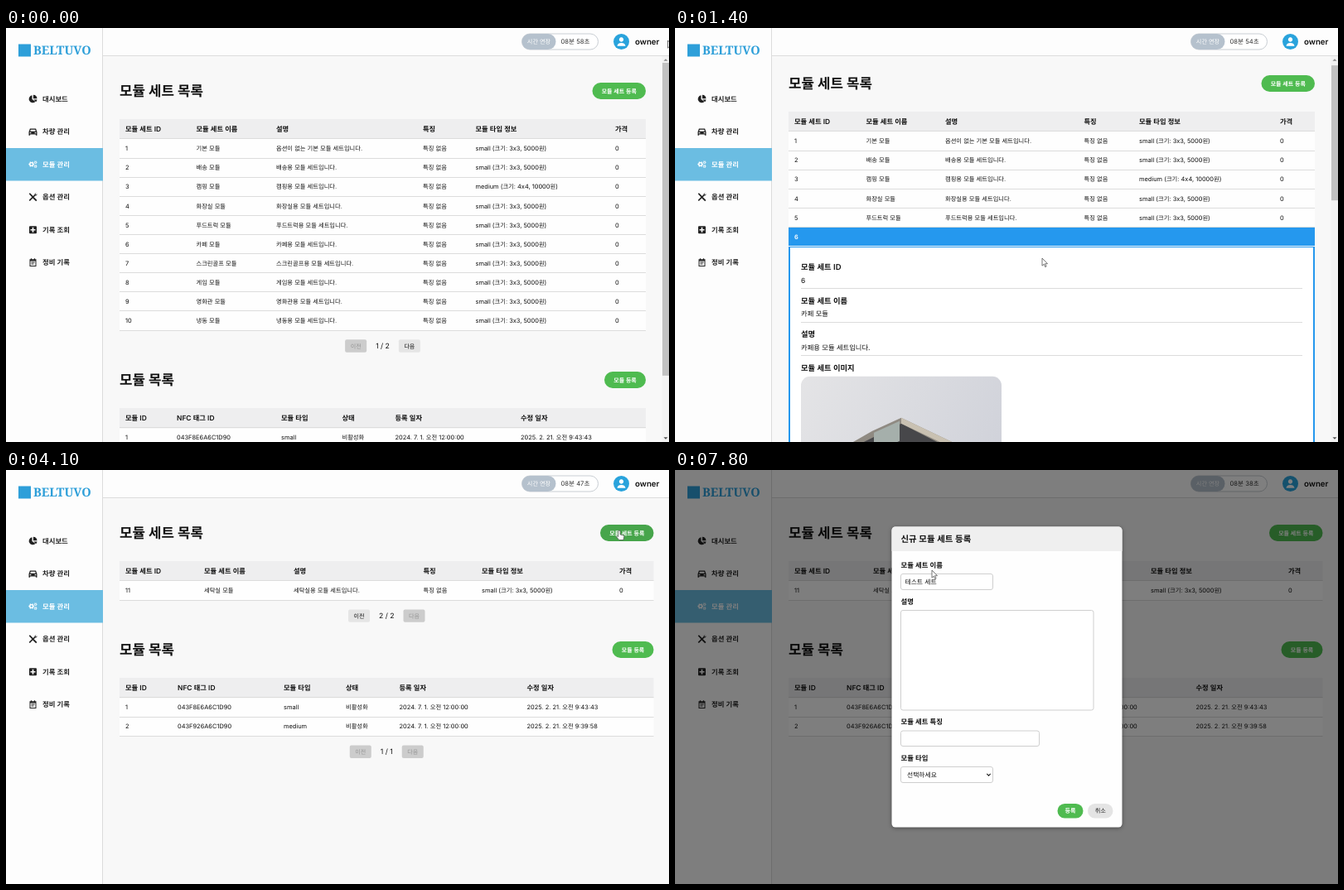
An HTML page with a canvas that plays this animation: 800 px wide and 500 px high, repeating every 8000 ms.

```html
<!DOCTYPE html>
<html lang="ko">
<head>
<meta charset="utf-8">
<title>모듈 관리</title>
<style>
  html, body { margin: 0; width: 100%; height: 100%; overflow: hidden; background: #f8f8f8; }
  canvas { display: block; width: 800px; height: 500px; }
</style>
</head>
<body>
<canvas id="stage" width="800" height="500"></canvas>
<script>
const ctx = document.getElementById('stage').getContext('2d');
ctx.textRendering = 'geometricPrecision';

const LOOP = 8000, STEP = 100;
const BLUE = '#2e9fd9', OPEN_BLUE = '#2598ee', GREEN = '#4fbb50', INK = '#111', LINE = '#dcdcdc';
const ROW = 23.1, LEFT = 137;
const HANGUL = /[가-힣ㄱ-ㅎ]+|[^가-힣ㄱ-ㅎ]+/g;

// ---- timing tables: [ms, value...] ----
const SCROLL = [[0, 0], [600, 0], [1000, 449], [1300, 9], [1700, 9], [2400, 770]];
const POINTER = [
  [0, 798.5, 15], [400, 430, 146], [600, 430, 146], [1000, 409, 172], [1300, 440, 250],
  [1400, 443, 278], [1800, 443, 278], [2500, 484.5, 349], [3000, 484.5, 349], [4000, 740, 73],
  [5200, 740, 73], [5400, 600, 95], [6000, 310, 132], [6200, 310, 121]
];
const OPEN_FIRST = 500, OPEN_CAFE = 1300, NEXT_PAGE = 2700, OPEN_MODAL = 4800, TYPE_START = 6500;
const TYPED = ['ㅌ', '테', '텟', '테스', '테슽', '테스트', '테스트 ', '테스트 ㅅ',
  '테스트 세', '테스트 셑', '테스트 세트'];

// ---- data ----
const SMALL = 'small (크기: 3x3, 5000원)', MEDIUM = 'medium (크기: 4x4, 10000원)';
const KINDS = ['기본', '배송', '캠핑', '화장실', '푸드트럭', '카페', '스크린골프', '게임', '영화관', '냉동', '세탁실'];
const SETS = KINDS.map((kind, i) => [
  String(i + 1), kind + ' 모듈',
  i ? kind + '용 모듈 세트입니다.' : '옵션이 없는 기본 모듈 세트입니다.',
  '특징 없음', i === 2 ? MEDIUM : SMALL, '0'
]);
const SET_HEADS = ['모듈 세트 ID', '모듈 세트 이름', '설명', '특징', '모듈 타입 정보', '가격'];
const MODULES = [
  ['1', '043F8E6A6C1D90', 'small', '비활성화', '2024. 7. 1. 오전 12:00:00', '2025. 2. 21. 오전 9:43:43'],
  ['2', '043F926A6C1D90', 'medium', '비활성화', '2024. 7. 1. 오전 12:00:00', '2025. 2. 21. 오전 9:39:58']
];
const MODULE_HEADS = ['모듈 ID', 'NFC 태그 ID', '모듈 타입', '상태', '등록 일자', '수정 일자'];
const OPTIONS = [['테이블', 'x2'], ['의자', 'x4'], ['냉장고', 'x1'], ['커피머신', 'x1'], ['조명', 'x2'], ['소파', 'x1']];
const COLS = {
  closed: [144, 229.5, 326, 503, 566.5, 735],
  open: [144, 230.5, 326, 493.5, 560, 730],
  last: [144, 239, 347, 503.5, 574, 740],
  modules: [144, 206, 332, 405.5, 469.5, 621],
  modulesWide: [144, 207, 335, 410, 474.5, 628.5]
};

// ---- drawing helpers ----
function setFont(part, size, weight) {
  ctx.font = /[가-힣ㄱ-ㅎ]/.test(part)
    ? `${weight} ${size * 0.94}px "Noto Sans CJK KR", "Noto Sans CJK", sans-serif`
    : `${weight} ${size * 0.96}px Inter, sans-serif`;
}

function textWidth(str, size, weight = 400) {
  return str.match(HANGUL).reduce((sum, part) => {
    setFont(part, size, weight);
    return sum + ctx.measureText(part).width;
  }, 0);
}

// y is the visual middle of the line
function text(str, x, y, size, weight = 400, color = INK, centered = false) {
  if (centered) x -= textWidth(str, size, weight) / 2;
  ctx.fillStyle = color;
  for (const part of str.match(HANGUL)) {
    setFont(part, size, weight);
    ctx.fillText(part, x, y + size * 0.35);
    x += ctx.measureText(part).width;
  }
}

function rect(x, y, w, h, color) {
  ctx.fillStyle = color;
  ctx.fillRect(x, y, w, h);
}

function box(x, y, w, h, r, fill, stroke) {
  ctx.beginPath();
  ctx.roundRect(x, y, w, h, r);
  if (fill) { ctx.fillStyle = fill; ctx.fill(); }
  if (stroke) { ctx.strokeStyle = stroke; ctx.lineWidth = 1; ctx.stroke(); }
}

function hline(x1, x2, y) {
  rect(x1, Math.round(y), x2 - x1, 1, LINE);
}

function shape(d, x, y, fill, stroke, width = 1) {
  const path = new Path2D(d);
  ctx.save();
  ctx.translate(x, y);
  if (fill) { ctx.fillStyle = fill; ctx.fill(path, 'evenodd'); }
  if (stroke) { ctx.strokeStyle = stroke; ctx.lineWidth = width; ctx.stroke(path); }
  ctx.restore();
}

function ease(p) { return p * p * (3 - 2 * p); }

function at(keys, t) {
  let i = keys.length - 1;
  while (i > 0 && keys[i][0] > t) i--;
  const a = keys[i], b = keys[i + 1];
  if (!b) return a.slice(1);
  const p = ease((t - a[0]) / (b[0] - a[0]));
  return a.slice(1).map((v, k) => v + (b[k + 1] - v) * p);
}

// ---- page frame ----
const MENU = [
  ['대시보드', 'M-1-4.6A4.6 4.6 0 1 0 3 3.2L-1 .2Z M.4-5A4.8 4.8 0 0 1 5-.6H.4Z M.8.7H5A4.8 4.8 0 0 1 3.7 3.4Z'],
  ['차량 관리', 'M-5 .2L-3.6-3.8H3.6L5 .2V4.5H3.4V3.2H-3.4V4.5H-5Z M-3.4-.5H3.4L2.6-2.6H-2.6Z M-3.8 .8h1.6v1.2h-1.6Z M2.2 .8h1.6v1.2h-1.6Z'],
  ['모듈 관리', null],
  ['옵션 관리', 'M-4.8-4L-3.6-5L.2-1.2L2-3Q1.8-5 4-4.8L2.8-3.4L3.6-2.7L5-4Q5.2-1.6 3-1.8L1.2 0L5 3.6L3.6 5L-.2 1.2L-3.6 4.8L-4.9 3.6L-1.2 0Z'],
  ['기록 조회', 'M-4.5-3.5q0-1 1-1h7q1 0 1 1v7q0 1-1 1h-7q-1 0-1-1Z M-.8-3V-.8H-3V.8H-.8V3H.8V.8H3V-.8H.8V-3Z'],
  ['정비 기록', 'M-4-4H-2.6V-5H-1.4V-4H1.4V-5H2.6V-4H4V4.6H-4Z M-3-1.8V3.6H3V-1.8Z M-2-.8H2V.2H-2Z M-2 1.3H1V2.3H-2Z']
];

function gear(x, y, r) {
  ctx.strokeStyle = '#fff';
  ctx.lineWidth = r * 0.75;
  ctx.beginPath();
  ctx.arc(x, y, r, 0, 7);
  ctx.stroke();
  for (let i = 0; i < 6; i++) {
    const a = i * Math.PI / 3;
    ctx.beginPath();
    ctx.moveTo(x + r * Math.cos(a), y + r * Math.sin(a));
    ctx.lineTo(x + r * 1.75 * Math.cos(a), y + r * 1.75 * Math.sin(a));
    ctx.stroke();
  }
}

function sidebar() {
  rect(0, 0, 116, 500, '#fdfdfd');
  rect(116, 0, 1, 500, LINE);
  rect(15, 19.5, 15, 15, BLUE);
  ctx.font = '700 14.6px "Noto Serif", serif';
  ctx.fillStyle = BLUE;
  ctx.fillText('BELTUVO', 33, 32.3);
  rect(0, 145, 117, 39.5, '#6bbde2');
  MENU.forEach(([label, icon], i) => {
    const y = 85.5 + i * 39.5, color = icon ? '#222' : '#fff';
    if (icon) shape(icon, 32.5, y + 0.3, color);
    else { gear(30.7, y, 1.9); gear(35.6, y - 2.2, 1.1); gear(35.6, y + 2.5, 1.1); }
    text(label, 44, y, 8.9, 600, color);
  });
}

function topbar(t) {
  rect(117, 0, 683, 33, '#fdfdfd');
  rect(117, 33, 683, 1, LINE);
  box(622.5, 7, 92, 19, 9.5, '#fff', '#c9ced3');
  box(622.5, 7, 41, 19, 9.5, '#b5c1cd');
  text('시간 연장', 643, 16.5, 7.6, 400, '#fff', true);
  const sec = Math.floor(58.42 - t * 2.55 / 1000);
  text(`08분 ${sec}초`, 669.5, 16.5, 8, 400, '#333');
  ctx.fillStyle = '#29a3dc';
  ctx.beginPath();
  ctx.arc(742.5, 16.5, 9.5, 0, 7);
  ctx.fill();
  shape('M0-5.2A2.7 2.7 0 1 1 -.01-5.2Z M-5 5.2Q-4.6 1.4 0 1.4Q4.6 1.4 5 5.2Z', 742.5, 16.5, '#fff');
  text('owner', 759, 16.5, 10.1, 600);
}

function scrollbar(scroll, height) {
  rect(791.5, 34, 8.5, 466, '#f3f3f3');
  shape('M-2.5 1.3L0-1.3L2.5 1.3Z', 796, 38.5, '#8a8a8a');
  shape('M-2.5-1.3L0 1.3L2.5-1.3Z', 796, 495.5, '#505050');
  const k = 450 / height;
  rect(792, 42 + scroll * k, 8, 466 * k, '#c1c1c1');
}

// ---- content ----
function poly(points, color) {
  ctx.fillStyle = color;
  ctx.beginPath();
  for (let i = 0; i < points.length; i += 2) ctx.lineTo(points[i], points[i + 1]);
  ctx.fill();
}

function picture(y, isCafe) {
  ctx.save();
  ctx.translate(152, y);
  const tone = ctx.createLinearGradient(0, 0, 242, isCafe ? 120 : 0);
  const tones = isCafe ? ['#e4e4e6', '#dadbe0', '#cfd1d9'] : ['#d3d2d1', '#e4e3e2', '#dad9d7'];
  tones.forEach((color, i) => tone.addColorStop(i / 2, color));
  box(0, 0, 242, 224, 11, tone);
  ctx.clip();
  if (isCafe) {
    poly([58, 82, 86, 66, 121, 50, 205, 90, 205, 165, 122, 208, 58, 172], '#8f8a82');
    poly([66, 84, 121, 57, 195, 95, 125, 140], '#47474a');
    poly([88, 68, 119, 54, 119, 78, 88, 92], '#a5afab');
    poly([121, 50, 205, 90, 203, 96, 121, 57], '#c9c1b2');
  } else {
    poly([50, 70, 130, 40, 195, 65, 195, 150, 154, 172, 50, 140], '#c4c5c8');
    poly([60, 80, 128, 52, 185, 72, 150, 165, 64, 132], '#f2f2f2');
    poly([124, 160, 172, 160, 166, 174, 146, 176], '#3c3d42');
    poly([132, 176, 172, 166, 190, 173, 154, 183], '#f8f8f8');
    poly([132, 176, 154, 183, 154, 224, 132, 214], '#ebebea');
    poly([154, 183, 190, 173, 190, 210, 154, 224], '#d0cfce');
  }
  ctx.restore();
}

function optionTable(y) {
  box(152.5, y + 0.5, 120, 126, 1, '#fafafa', LINE);
  OPTIONS.forEach(([name, count], i) => {
    if (i) hline(152, 272, y + i * 21);
    text(name, 159, y + i * 21 + 11.5, 7.8);
    text(count, 248.5, y + i * 21 + 11.5, 7.8);
  });
}

// Returns the height of the opened panel
function detail(top, row) {
  const isCafe = row[0] === '6', tail = isCafe ? 570.1 : 462.5, height = tail + 160.6;
  const y0 = Math.round(top), y1 = Math.ceil(top + height), y = top + 0.7;
  rect(LEFT, y0, 635, y1 - y0, OPEN_BLUE);
  rect(LEFT + 2, y0 + 1, 631, y1 - y0 - 3, '#fff');
  const field = (label, value, fy, ruled = true) => {
    text(label, 152, fy + 15, 9.9, 600);
    text(value, 152, fy + 30.5, 8.85);
    if (ruled) hline(152, 757, fy + 40.5);
  };
  SET_HEADS.slice(0, 3).forEach((label, i) => field(label, row[i], y + 9.7 + i * 40.5));
  text('모듈 세트 이미지', 152, y + 146.5, 9.9, 600);
  picture(y + 156.5, isCafe);
  hline(152, 757, y + 387.5);
  text('모듈 세트에 포함된 옵션', 152, y + 402.5, 9.9, 600);
  if (isCafe) optionTable(Math.round(y + 417));
  else text('등록된 옵션이 없습니다.', 152, y + 426.5, 8.85);
  hline(152, 757, y + tail);
  ['특징', '모듈 타입', '가격'].forEach((label, i) =>
    field(label, row[i + 3], y + tail + i * 40.5, i < 2));
  const by = y + tail + 136;
  box(685.5, by - 9.2, 31.5, 18.4, 9.2, '#f7c518');
  shape('M-3 3L-2.6 1.2L1.2-2.6L2.6-1.2L-1.2 2.6Z', 701, by, '#fff');
  box(725.5, by - 9.2, 31.5, 18.4, 9.2, '#e12d33');
  shape('M-2.8-2.8H-1V-3.5H1V-2.8H2.8V-2H-2.8Z M-2.3-1.4H2.3V3.3H-2.3Z', 741, by, '#fff');
  return height;
}

function pager(cx, y, page, count, hover) {
  const label = `${page} / ${count}`, half = textWidth(label, 9) / 2 + 11;
  text(label, cx, y, 9, 400, INK, true);
  [['이전', cx - half - 26, page > 1], ['다음', cx + half, page < count]].forEach(([name, x, on], i) => {
    const fill = !on ? '#cccccc' : i && hover ? '#dadada' : '#e5e5e5';
    box(x, y - 7.7, 26, 15.4, 2, fill);
    text(name, x + 13, y, 7.5, 400, on ? INK : '#959595', true);
  });
}

// Draws a titled table and returns its lower edge
function section(y, right, title, button, buttonWidth, heads, cols, rows, opened, hover) {
  const titleY = Math.round(y), width = right - LEFT;
  text(title, LEFT, titleY, 17.9, 700);
  box(right - buttonWidth, titleY - 10, buttonWidth, 20, 10, hover ? '#47a54b' : GREEN);
  text(button, right - buttonWidth / 2, titleY, 7.45, 600, '#fff', true);
  rect(LEFT, titleY + 34, width, 24, '#eeeeef');
  heads.forEach((head, i) => text(head, cols[i], y + 46, 8.8, 600));
  let top = y + 58;
  hline(LEFT, right, top - 1);
  for (const row of rows) {
    const mid = top + ROW / 2, isOpen = row[0] === opened;
    const y0 = Math.ceil(top), y1 = Math.floor(top + ROW);
    rect(LEFT, y0, width, y1 - y0, isOpen ? OPEN_BLUE : '#fefefe');
    if (isOpen) text(row[0], cols[0], mid, 7.8, 600, '#fff');
    else row.forEach((cell, i) => text(cell, cols[i], mid, 7.75));
    top += ROW;
    if (isOpen) top += detail(top, row);
    else hline(LEFT, right, y1);
  }
  return top;
}

function content(t) {
  const last = t >= NEXT_PAGE;
  const opened = last || t < OPEN_FIRST ? null : t < OPEN_CAFE ? '1' : '6';
  const scroll = last ? 0 : at(SCROLL, t)[0];
  const right = last ? 781.5 : 772, cx = (LEFT + right) / 2;
  const cols = last ? COLS.last : opened ? COLS.open : COLS.closed;
  const hot = t >= 3900 && t < OPEN_MODAL;
  rect(117, 34, 683, 466, '#f8f8f8');
  ctx.save();
  ctx.beginPath();
  ctx.rect(117, 34, 683, 466);
  ctx.clip();
  ctx.translate(0, -Math.round(scroll));
  let end = section(76, right, '모듈 세트 목록', '모듈 세트 등록', 64.5, SET_HEADS, cols,
    last ? SETS.slice(10) : SETS.slice(0, 10), opened, hot);
  pager(cx, end + 19, last ? 2 : 1, 2, t >= 2500);
  end = section(end + 60, right, '모듈 목록', '모듈 등록', 50, MODULE_HEADS,
    last ? COLS.modulesWide : COLS.modules, MODULES);
  pager(cx, end + 19, 1, 1);
  ctx.restore();
  if (!last) scrollbar(scroll, { 1: 1178, 6: 1286 }[opened] || 555);
}

// ---- dialog ----
function typedText(t) {
  if (t < TYPE_START) return '';
  const i = Math.floor((t - TYPE_START) / 100) - (t >= 7100 ? 1 : 0);
  return TYPED[Math.min(i, TYPED.length - 1)];
}

function modal(t) {
  rect(0, 0, 800, 500, 'rgba(0,0,0,.5)');
  ctx.save();
  ctx.shadowColor = 'rgba(0,0,0,.4)';
  ctx.shadowBlur = 5;
  ctx.shadowOffsetY = 1;
  box(261.5, 68.5, 278, 363, 4.5, '#fefefe');
  ctx.restore();
  box(261.5, 68.5, 278, 29.5, [4.5, 4.5, 0, 0], '#efefef');
  text('신규 모듈 세트 등록', 272.5, 83.5, 11.1, 600);
  const fields = [
    ['모듈 세트 이름', 115, 125.5, 111, 19], ['설명', 158.5, 169.5, 232.5, 120.5],
    ['모듈 세트 특징', 304, 315, 167, 18.5], ['모듈 타입', 347.5, 358.5, 111, 19]
  ];
  for (const [label, ly, y, w, h] of fields) {
    text(label, 272.5, ly, 8.9, 600);
    box(272.5, y, w, h, 2.5, '#fff', '#cfcfcf');
  }
  const typed = typedText(t);
  if (typed) text(typed, 277.5, 135.3, 8.3);
  text('선택하세요', 280, 368, 8.3);
  shape('M-2.2-1.1L0 1.2L2.2-1.1', 378.5, 368, null, '#222', 1.1);
  box(461.5, 403, 31, 17.5, 8.7, GREEN);
  text('등록', 477, 411.7, 7.6, 600, '#fff', true);
  box(498, 403, 30.5, 17.5, 8.7, '#e4e4e4');
  text('취소', 513.2, 411.7, 7.6, 400, '#222', true);
}

function pointer(t) {
  const [x, y] = at(POINTER, t);
  const hand = (t >= 2500 && t < NEXT_PAGE) || (t >= 3900 && t < OPEN_MODAL);
  const d = hand
    ? 'M-1.2 1.2a1.2 1.2 0 0 1 2.4 0V5l3.4.7q1.3.4 1.2 1.7L5 11.5H-.2L-3.6 7.6q.6-1.4 2.4-.2Z'
    : 'M0 0V9.2L2.2 7.2L3.7 10.6L5.1 10L3.6 6.7H6.5Z';
  shape(d, x, y, '#fff', '#555', 0.8);
}

function draw(t) {
  content(t);
  sidebar();
  topbar(t);
  if (t >= OPEN_MODAL) modal(t);
  pointer(t);
}

const start = performance.now();
function tick() {
  const t = (performance.now() - start) % LOOP;
  draw(Math.floor(t / STEP) * STEP);
  requestAnimationFrame(tick);
}
tick();
</script>
</body>
</html>
```
